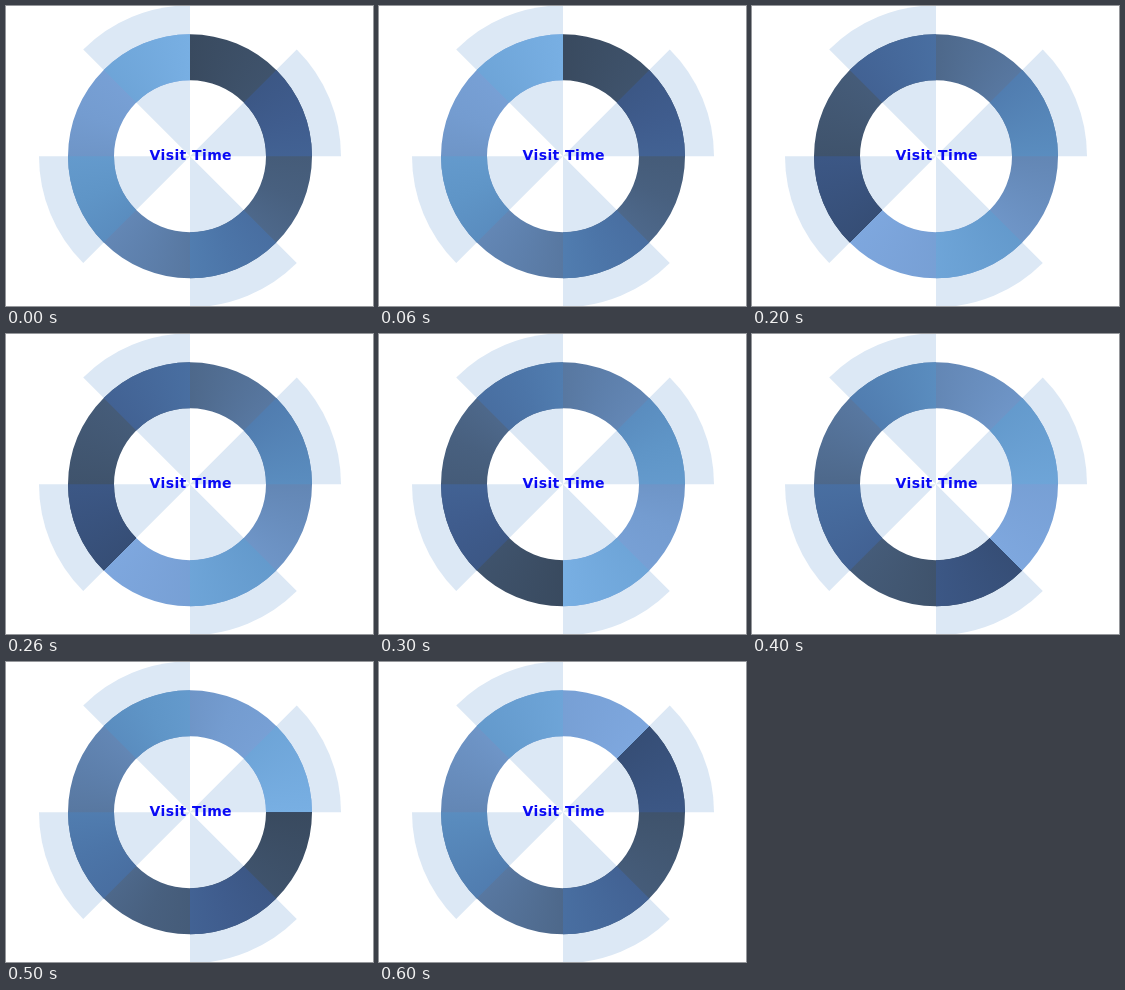
Recreate the animation shown at these times as an HTML page with a canvas. Size 367x300 px, loop 0.7 s.

```html
<!DOCTYPE html>
<html lang="en">
<head>
<meta charset="utf-8">
<title>Visit Time</title>
<style>
html, body { margin: 0; width: 100%; height: 100%; overflow: hidden; background: #fff; }
canvas { display: block; }
</style>
</head>
<body>
<canvas id="stage" width="367" height="300"></canvas>
<script>
const ctx = document.getElementById('stage').getContext('2d');
const CX = 184, CY = 150.3, EIGHTH = Math.PI / 4;
const INNER = 76, OUTER = 122, BLADE = 151;
const seams = [0, 6, 5, 4, 3, 2, 1]; // dark end of the ring, in eighths clockwise from the top
const greyStops = [[0, '#394a5f'], [.31, '#48607f'], [.56, '#5d7fab'], [.81, '#749cd0'], [1, '#7ea7de']];
const blueStops = [[0, '#364e76'], [.19, '#3f5c8d'], [.44, '#4c75a8'], [.69, '#5f95c7'], [1, '#78afe3']];

const angle = eighths => (eighths - 2) * EIGHTH;

function sweep(stops, seam) {
  const gradient = ctx.createConicGradient(angle(seam), CX, CY);
  stops.forEach(([at, color]) => gradient.addColorStop(at, color));
  return gradient;
}

function fillArc(from, to, inner, outer, fill) {
  ctx.beginPath();
  ctx.arc(CX, CY, outer, angle(from), angle(to));
  ctx.arc(CX, CY, inner, angle(to), angle(from), true);
  ctx.fillStyle = fill;
  ctx.fill();
}

function draw(seam) {
  ctx.fillStyle = '#fff';
  ctx.fillRect(0, 0, 367, 300);
  const blades = [1, 3, 5, 7];
  for (const b of blades) fillArc(b, b + 1, 0, BLADE, '#dce8f5');
  fillArc(0, 8, INNER, OUTER, sweep(greyStops, seam));
  const blue = sweep(blueStops, seam);
  for (const b of blades) fillArc(b, b + 1, INNER, OUTER, blue);

  ctx.font = 'bold 14px "DejaVu Sans", sans-serif';
  ctx.letterSpacing = '0.4px';
  ctx.fillStyle = '#0a0af5';
  ctx.fillText('Visit Time', 143.5, 154);
}

function tick() {
  draw(seams[Math.floor(performance.now() / 100) % seams.length]);
  requestAnimationFrame(tick);
}
tick();
</script>
</body>
</html>
```
